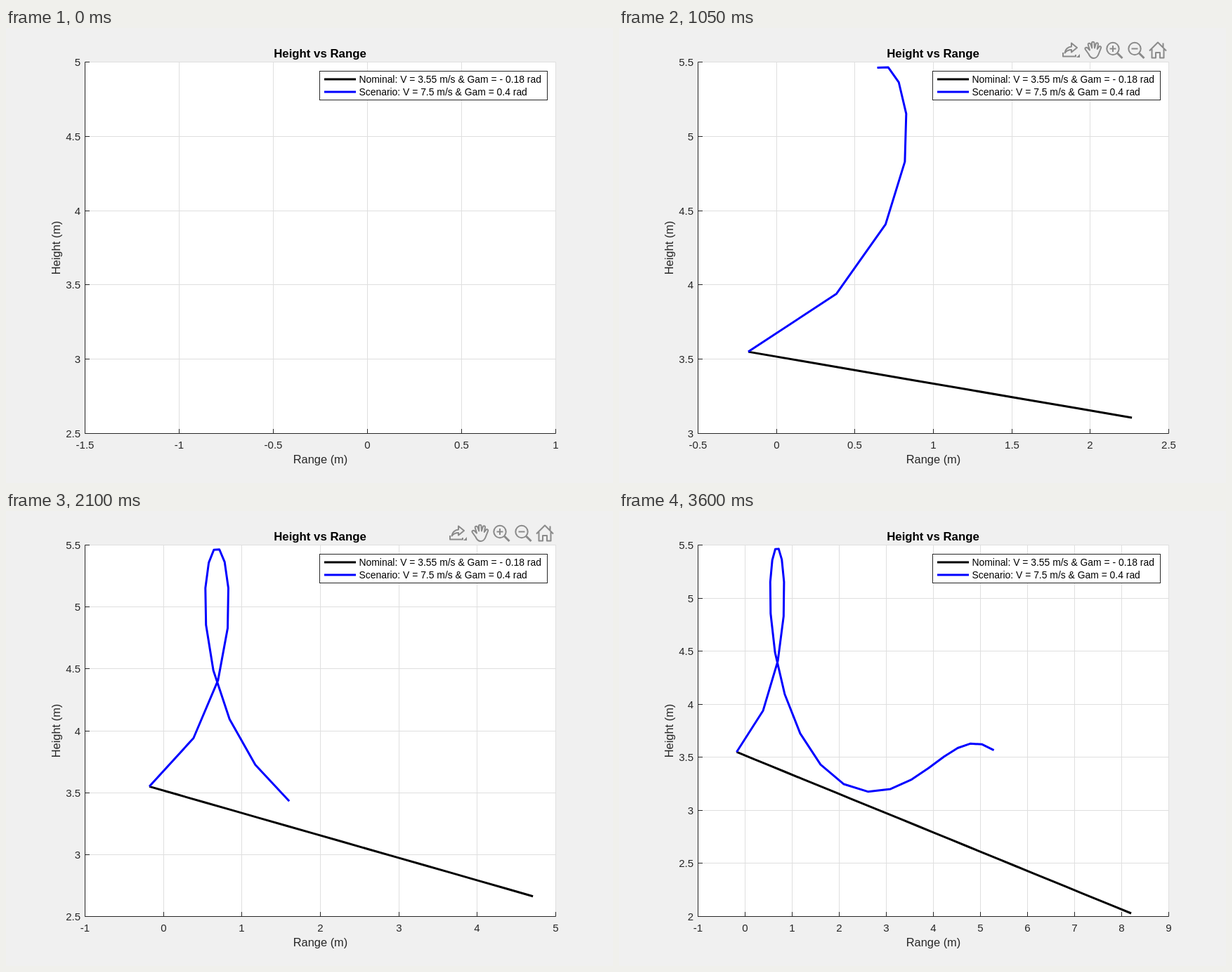
These frames come from a looping animation (864x648 px, 3750 ms). An HTML page:

```html
<!DOCTYPE html>
<html lang="en">
<head>
<meta charset="utf-8">
<title>Height vs Range</title>
<style>
  html, body { margin: 0; width: 100%; height: 100%; overflow: hidden; background: #f0f0f0; }
  svg { display: block; width: 864px; height: 648px; font-family: "Liberation Sans", Arial, sans-serif; fill: #262626; }
  .ticks { font-size: 15px; }
  .label { font-size: 16.4px; text-anchor: middle; }
  .title { font-size: 16.8px; font-weight: bold; text-anchor: middle; fill: #000; }
  .legend { font-size: 13.9px; fill: #000; }
  .grid { stroke: #dfdfdf; }
  .axis { stroke: #262626; fill: none; }
  .curve { fill: none; stroke-width: 3; stroke-linejoin: round; }
  .nominal { stroke: #000; }
  .scenario { stroke: #00f; }
  .tools { fill: none; stroke: #8a8a8a; stroke-width: 2; stroke-linejoin: round; }
</style>
</head>
<body>
<svg viewBox="0 0 864 648">
  <rect width="864" height="648" fill="#f0f0f0"/>
  <rect x="112.5" y="48.5" width="670" height="529" fill="#fff"/>
  <path id="grid" class="grid"/>
  <path id="axis" class="axis"/>
  <polyline id="nominal" class="curve nominal"/>
  <polyline id="scenario" class="curve scenario"/>
  <g id="ticks" class="ticks"></g>
  <text class="title" x="447" y="42">Height vs Range</text>
  <text class="label" x="447.5" y="620">Range (m)</text>
  <text id="heightLabel" class="label">Height (m)</text>
  <g class="legend">
    <rect x="446.5" y="61.5" width="324" height="41" fill="#fff" stroke="#262626"/>
    <path class="curve nominal" d="M453 73H498"/>
    <path class="curve scenario" d="M453 91H498"/>
    <text x="502.5" y="78">Nominal: V = 3.55 m/s &amp; Gam = - 0.18 rad</text>
    <text x="502.5" y="96">Scenario: V = 7.5 m/s &amp; Gam = 0.4 rad</text>
  </g>
  <g id="tools" class="tools">
    <path d="M632 35V40.5H650V38M634.5 35.5C635.5 29.5 639 27 644 26.5V21.5L652 28L644 34.5V31C640 31 637 32.5 634.5 35.5Z"/>
    <path d="M651 42H656V37Z" fill="#8a8a8a" stroke="none"/>
    <path d="M668.5 37L663.8 30.5C662.6 28 665.5 26.7 667.3 28.7L670 31.5L667.8 24C667.4 21.4 670.6 20.8 671.4 23.2L673.2 28.5L673 21.5C673 19.2 676.4 19.2 676.5 21.5L677 28.5L678.8 22.5C679.5 20.3 682.3 21 682 23.4L680.8 30L683.2 26.8C684.6 25.2 686.9 26.4 686 28.6L682.5 37.5C681 41.5 678.5 43 675.5 43C672 43 670 40.5 668.5 37Z"/>
    <g id="lens"><circle cx="703" cy="29.5" r="8.7"/><path d="M698.5 29.5H707.5"/><path d="M709.5 36L716.5 43" stroke-width="3"/></g>
    <path d="M703 25V34"/>
    <use href="#lens" x="31"/>
    <path d="M755 32.5L767 20.5L779 32.5M758.5 30V42.5H764V35H770V42.5H775.5V30M774.5 27V21.5"/>
  </g>
</svg>
<script>
const FRAME_MS = 150, FRAMES = 25;
const LEFT = 112.5, RIGHT = 782.5, TOP = 48.5, BOTTOM = 577.5;
const $ = id => document.getElementById(id);

// Glider: mass, wing area, air density and coefficients at best lift/drag.
const G = 9.8, MASS = 0.003, AREA = 0.017, RHO = 1.225, CD0 = 0.02;
const INDUCED = 1 / (Math.PI * 0.9 * 0.86);
const PRESSURE = RHO * AREA / (2 * MASS);
const DRAG = PRESSURE * 2 * CD0, LIFT = PRESSURE * Math.sqrt(CD0 / INDUCED);

// State: speed, path angle, height, range.
const rates = ([v, a]) => [
  -DRAG * v * v - G * Math.sin(a),
  LIFT * v - G * Math.cos(a) / v,
  v * Math.sin(a),
  v * Math.cos(a)
];
const advance = (s, d, h) => s.map((value, i) => value + d[i] * h);

function rungeKutta(s, h) {
  const a = rates(s), b = rates(advance(s, a, h / 2));
  const c = rates(advance(s, b, h / 2)), d = rates(advance(s, c, h));
  return advance(s, a.map((_, i) => (a[i] + 2 * b[i] + 2 * c[i] + d[i]) / 6), h);
}

function fly(speed, angle) {
  let state = [speed, angle, 3.55, -0.18];
  const points = [];
  for (let i = 0; i < FRAMES; i++) {
    points.push([state[3], state[2]]);
    for (let j = 0; j < 10; j++) state = rungeKutta(state, 0.01);
  }
  return points;
}

const flights = { nominal: fly(3.55, -0.18), scenario: fly(7.5, 0.4) };

// Smallest round step that covers the values in at most ten intervals.
function makeScale(values, from, to) {
  let min = Math.min(...values), max = Math.max(...values);
  if (min === max) { min -= 1; max += 1; }
  const step = [0.05, 0.1, 0.2, 0.5, 1, 2].find(s => Math.ceil(max / s) - Math.floor(min / s) <= 10);
  const first = Math.floor(min / step), last = Math.ceil(max / step);
  const map = v => from + (v / step - first) / (last - first) * (to - from);
  const ticks = [];
  for (let i = first; i <= last; i++) ticks.push(i * step);
  return { step, map, ticks };
}

const snap = v => Math.floor(v + 1e-6) + 0.5;
const tickText = (v, x, y, anchor) =>
  `<text x="${x}" y="${y}" text-anchor="${anchor}">${Number(v.toFixed(2))}</text>`;

function draw(frame) {
  const shown = Object.entries(flights).map(([id, points]) => [id, points.slice(0, frame + 1)]);
  const all = shown.flatMap(([, points]) => points);
  const xs = makeScale(all.map(p => p[0]), LEFT, RIGHT);
  const ys = makeScale(all.map(p => p[1]), BOTTOM, TOP);

  let grid = "", axis = `M${LEFT} ${TOP}V${BOTTOM}H${RIGHT}`, labels = "";
  for (const v of xs.ticks) {
    const x = snap(xs.map(v));
    grid += `M${x} ${TOP}V${BOTTOM}`;
    axis += `M${x} ${BOTTOM}v-6.5`;
    labels += tickText(v, x, 598.5, "middle");
  }
  for (const v of ys.ticks) {
    const y = snap(ys.map(v));
    grid += `M${LEFT} ${y}H${RIGHT}`;
    axis += `M${LEFT} ${y}h6.5`;
    labels += tickText(v, 106, y + 5.5, "end");
  }
  $("grid").setAttribute("d", grid);
  $("axis").setAttribute("d", axis);
  $("ticks").innerHTML = labels;

  for (const [id, points] of shown) {
    $(id).setAttribute("points", points.map(([x, y]) => `${xs.map(x)},${ys.map(y)}`).join(" "));
  }
  const labelX = ys.step < 0.1 ? 68 : 76.5;
  $("heightLabel").setAttribute("transform", `translate(${labelX} 313) rotate(-90)`);
  $("tools").style.display = frame >= 2 && frame < 16 ? "" : "none";
}

let current = -1;
const start = performance.now();
function tick(now) {
  const frame = Math.floor(Math.max(0, now - start) / FRAME_MS) % FRAMES;
  if (frame !== current) draw(current = frame);
  requestAnimationFrame(tick);
}
tick(start);
</script>
</body>
</html>
```
